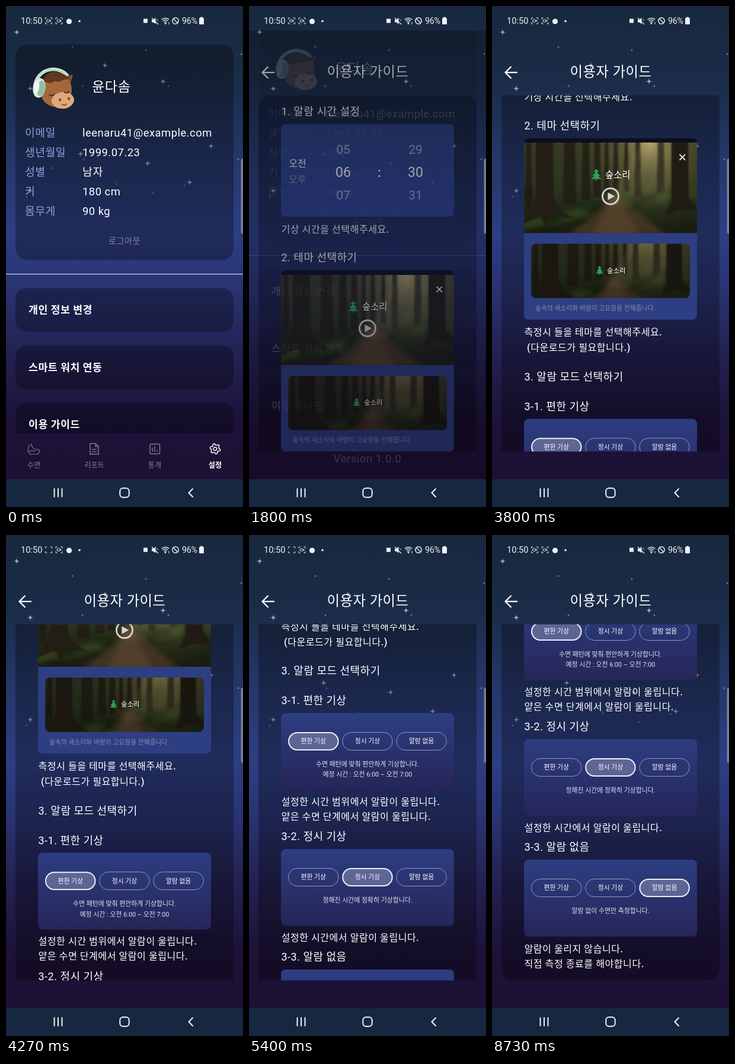
An HTML page with a canvas for the animation above (8.8 s loop, 400 by 844 pixels).

```html
<!DOCTYPE html>
<html lang="ko">
<head>
<meta charset="utf-8">
<title>이용자 가이드</title>
<style>
html, body { margin: 0; width: 100%; height: 100%; overflow: hidden; background: #18283e; }
canvas { display: block; width: 400px; height: 844px; }
</style>
</head>
<body>
<canvas id="stage"></canvas>
<script>
const W = 400, H = 844, LOOP = 8800;
const FONT = 'Roboto, "Noto Sans CJK KR", "Noto Sans CJK", sans-serif';
const SHADE = 'rgba(0,0,0,.3)';
const dpr = window.devicePixelRatio || 1;

function setUp(canvas, w = W, h = H) {
  canvas.width = w * dpr;
  canvas.height = h * dpr;
  const c = canvas.getContext('2d');
  c.scale(dpr, dpr);
  return c;
}
const main = setUp(document.getElementById('stage'));
const buffer = setUp(document.createElement('canvas'));
let g = main;

// ---- helpers ----
const clamp = v => Math.max(0, Math.min(1, v));
const span = (t, a, b) => clamp((t - a) / (b - a));
const flick = p => 1 - Math.pow(1 - Math.pow(p, 1.5), 3);

function text(s, x, cy, size, color = '#fff', { ls = 0.5, weight = 400, align = 'left' } = {}) {
  g.font = `${weight} ${size}px ${FONT}`;
  g.letterSpacing = ls + 'px';
  g.textAlign = align;
  g.fillStyle = color;
  g.fillText(s, x, cy + size * 0.36);
}
const centered = (s, x, cy, size, color, weight = 400) =>
  text(s, x, cy, size, color, { ls: 0, weight, align: 'center' });

function box(x, y, w, h, r, fill, stroke, lw = 1) {
  g.beginPath();
  g.roundRect(x, y, w, h, r);
  if (fill) { g.fillStyle = fill; g.fill(); }
  if (stroke) { g.strokeStyle = stroke; g.lineWidth = lw; g.stroke(); }
}
function line(points, color, lw, close) {
  g.beginPath();
  points.forEach(([x, y]) => g.lineTo(x, y));
  if (close) g.closePath();
  g.strokeStyle = color;
  g.lineWidth = lw;
  g.stroke();
}
function poly(points, fill) {
  g.beginPath();
  points.forEach(([x, y]) => g.lineTo(x, y));
  g.fillStyle = fill;
  g.fill();
}
function oval(x, y, rx, ry, fill, rot = 0) {
  g.beginPath();
  g.ellipse(x, y, rx, ry, rot, 0, 7);
  g.fillStyle = fill;
  g.fill();
}
function arc(x, y, r, a, b, color, lw) {
  g.beginPath();
  g.arc(x, y, r, a, b);
  g.strokeStyle = color;
  g.lineWidth = lw;
  g.stroke();
}
function shade(y0, y1, ...stops) {
  const gr = g.createLinearGradient(0, y0, 0, y1);
  stops.forEach(([p, c]) => gr.addColorStop(p, c));
  return gr;
}
function clipped(x, y, w, h, r, draw) {
  g.save();
  g.beginPath();
  g.roundRect(x, y, w, h, r);
  g.clip();
  draw();
  g.restore();
}
function layer(alpha, draw) {
  if (alpha <= 0) return;
  if (alpha >= 1) return draw();
  g = buffer;
  g.clearRect(0, 0, W, H);
  draw();
  g = main;
  g.globalAlpha = alpha;
  g.drawImage(buffer.canvas, 0, 0, W, H);
  g.globalAlpha = 1;
}

// ---- backdrop ----
const bigStars = [[18, 44], [167, 100], [265, 127], [41, 139], [346, 236], [126, 249], [239, 265], [310, 297], [41, 311]];
const smallStars = [[112, 69], [236, 74], [397, 81], [274, 135], [129, 135], [131, 258], [392, 258], [78, 273], [187, 300], [301, 302], [35, 321], [248, 315]];

function star(x, y, r) {
  g.beginPath();
  g.moveTo(x, y - r);
  g.quadraticCurveTo(x, y, x + r, y);
  g.quadraticCurveTo(x, y, x, y + r);
  g.quadraticCurveTo(x, y, x - r, y);
  g.quadraticCurveTo(x, y, x, y - r);
  g.fill();
}
function backdrop() {
  g.fillStyle = shade(0, 797, [0, '#18283e'], [.16, '#1b2c48'], [.32, '#25376a'], [.48, '#2d3e82'],
    [.6, '#293371'], [.73, '#232253'], [.88, '#1d1238'], [1, '#1c1034']);
  g.fillRect(0, 0, W, H);
  g.fillStyle = 'rgba(205,205,215,.6)';
  bigStars.forEach(([x, y]) => { star(x, y, 6); oval(x, y, 1.6, 1.6, g.fillStyle); });
  smallStars.forEach(([x, y]) => oval(x, y, 1.5, 1.5, 'rgba(190,190,205,.5)'));
}

// ---- system bars ----
function viewfinder(x, camera) {
  const c = '#e8ebee', y = 25;
  for (const sx of [-1, 1]) for (const sy of [-1, 1])
    line([[x + sx * 2.8, y + sy * 5], [x + sx * 5.5, y + sy * 5], [x + sx * 5.5, y + sy * 2.5]], c, 1);
  if (!camera) return;
  box(x - 3.2, y - 2, 4.6, 4, 1, null, c, 1);
  poly([[x + 1.5, y], [x + 3.6, y - 2], [x + 3.6, y + 2]], c);
}
function statusBar(t) {
  const c = '#eef0f2';
  const blink = (((t - 2670) % 1010) + 1010) % 1010 < 490;
  text('10:50', 25, 25, 14.6, c, { ls: 0 });
  viewfinder(72, blink);
  viewfinder(89.5, true);
  oval(106.5, 26, 4.6, 4.6, c);
  oval(124, 25.5, 1.8, 1.8, c);
  g.fillStyle = c;
  g.fillRect(232, 21.5, 7, 7);
  poly([[246, 23], [249, 23], [252.5, 19.5], [252.5, 30.5], [249, 27.5], [246, 27.5]], c);
  line([[246, 20], [257, 31]], c, 1.2);
  line([[254, 22], [257, 25]], c, 1);
  for (const r of [3.5, 6.5, 9.5]) arc(269, 30, r, -2.3, -.85, c, 1.3);
  oval(269, 29.5, 1.4, 1.4, c);
  line([[275, 27], [275, 31]], c, 1);
  arc(286, 25, 5.2, 0, 7, c, 1.5);
  line([[282.3, 21.3], [289.7, 28.7]], c, 1.5);
  text('96%', 297, 25, 14.4, c, { ls: -.4 });
  box(326, 20, 8, 11, 1.2, c);
  g.fillRect(328, 18.6, 4, 2);
}
function navBar() {
  g.fillStyle = '#16273f';
  g.fillRect(0, 797, W, 47);
  for (const x of [81.5, 88, 94.5]) line([[x, 812.5], [x, 827.5]], '#f2f3f5', 2);
  box(192.3, 812.3, 15.4, 15.4, 5, null, '#f2f3f5', 2);
  line([[315.5, 813], [308.5, 820], [315.5, 827.5]], '#f2f3f5', 2);
}
const edgeHandle = () => box(396.5, 257, 8, 127, 4, 'rgba(150,154,170,.72)');

// ---- profile ----
function avatar() {
  arc(80, 138, 31, 2.9, 5.6, '#b9dcc2', 5);
  arc(80, 138, 33.5, 2.9, 5.6, '#dfeee4', 1.5);
  poly([[96, 122], [113, 115], [109, 130]], '#8a4f2c');
  oval(84, 141, 27, 29, '#a5663d');
  oval(96, 159, 19, 14, '#e0a878', -.1);
  g.beginPath();
  g.moveTo(62, 128);
  g.bezierCurveTo(66, 108, 88, 104, 110, 124);
  g.bezierCurveTo(98, 122, 94, 126, 88, 128);
  g.quadraticCurveTo(82, 124, 76, 130);
  g.quadraticCurveTo(68, 128, 62, 128);
  g.fillStyle = '#62371f';
  g.fill();
  arc(77, 146, 5, .3, 2.6, '#3b2115', 1.7);
  arc(102, 142, 4.5, .3, 2.6, '#3b2115', 1.7);
  oval(91, 158, 1.8, 2.5, '#6b3b22');
  oval(106, 156, 1.8, 2.5, '#6b3b22');
  arc(98, 162, 5, .5, 2.5, '#6b3b22', 1.3);
  oval(56, 138, 10.5, 16.5, '#d9ebde', .15);
  oval(59, 139, 7, 13, '#8fc0a2', .15);
  oval(52, 137, 4, 11, '#eef6f0', .15);
}
const facts = [['이메일', 'leenaru41@example.com'], ['생년월일', '1999.07.23'], ['성별', '남자'], ['키', '180 cm'], ['몸무게', '90 kg']];
const menu = ['개인 정보 변경', '스마트 워치 연동', '이용 가이드'];

function profile(scroll, bottom) {
  clipped(0, 41, W, bottom - 41, 0, () => {
    g.translate(0, -scroll);
    box(16, 65, 368, 363, 20, SHADE);
    avatar();
    text('윤다솜', 145, 136, 23.2);
    facts.forEach(([label, value], i) => {
      const y = 213 + i * 33;
      text(label, 32, y, 18.2, '#8f9edb');
      text(value, 129, y, 18.4);
    });
    text('로그아웃', 200, 396, 14.3, '#85858f', { ls: .3, align: 'center' });
    g.fillStyle = '#ccd0de';
    g.fillRect(0, 451, W, 1.3);
    menu.forEach((label, i) => {
      const y = 475.5 + i * 96.5;
      box(16, y, 368, 73, 18, SHADE);
      text(label, 38, y + 36.5, 17.3, '#fff', { weight: 600 });
    });
    text('Version 1.0.0', 200, 793.5, 18.5, '#f4f4f8', { align: 'center' });
  });
}

function gear(x, y) {
  const pts = [];
  for (let i = 0; i < 24; i++) {
    const a = i * Math.PI / 12 + Math.PI / 24, r = i % 4 < 2 ? 8.8 : 6.4;
    pts.push([x + r * Math.sin(a), y + r * Math.cos(a)]);
  }
  line(pts, '#fff', 1.5, true);
  arc(x, y, 2.8, 0, 7, '#fff', 1.5);
}
function tabBar() {
  const c = '#7c7b8c';
  g.lineJoin = 'round';
  g.beginPath();
  g.moveTo(43, 738);
  g.bezierCurveTo(35, 742, 36, 752, 41, 755);
  g.lineTo(53, 755);
  g.bezierCurveTo(57, 753, 57, 749, 55, 747);
  g.bezierCurveTo(48, 748, 43, 744, 43, 738);
  g.moveTo(39, 751);
  g.bezierCurveTo(43, 746, 47, 752, 50, 749);
  g.strokeStyle = c;
  g.lineWidth = 1.2;
  g.stroke();
  line([[142, 737], [151, 737], [156, 742], [156, 755], [142, 755]], c, 1.5, true);
  line([[151, 737], [151, 742], [156, 742]], c, 1.3);
  for (const y of [747, 751]) line([[145, y], [153, y]], c, 1.3);
  box(243, 738, 16.5, 16.5, 2, null, c, 1.5);
  [[247, 744], [251, 741.5], [255, 748]].forEach(([x, y]) => line([[x, y], [x, 751]], c, 1.5));
  gear(353, 746);
  ['수면', '리포트', '통계', '설정'].forEach((s, i) =>
    centered(s, 47 + i * 102, 774, 12.2, i === 3 ? '#fff' : c, i === 3 ? 700 : 500));
  g.lineJoin = 'miter';
}

// ---- guide ----
const PW = 292, PH = 152.5;

// Soft woodland picture, painted once and reused.
function paintForest() {
  g = setUp(document.createElement('canvas'), PW, PH);
  g.fillStyle = shade(0, PH, [0, '#383b26'], [.5, '#2c341f'], [.72, '#202a16'], [1, '#1c1c10']);
  g.fillRect(0, 0, PW, PH);
  const glow = g.createRadialGradient(212, 0, 0, 205, 12, 135);
  glow.addColorStop(0, 'rgba(205,185,120,.8)');
  glow.addColorStop(.35, 'rgba(125,115,68,.5)');
  glow.addColorStop(1, 'rgba(60,65,35,0)');
  g.fillStyle = glow;
  g.fillRect(0, 0, PW, PH);
  g.filter = `blur(${1.6 * dpr}px)`;
  [[4, 8, 112], [68, 18, 104], [99, 11, 96], [119, 9, 92], [137, 5, 84], [152, 6, 80], [170, 5, 82], [188, 8, 92], [226, 10, 100]]
    .forEach(([x, w, h]) => poly([[x, -5], [x + w, -5], [x + w + 2, h], [x - 2, h]], 'rgba(34,29,20,.85)'));
  g.filter = `blur(${4 * dpr}px)`;
  for (let i = 0; i < 40; i++) {
    const x = PW * ((i * .381) % 1), y = 84 + 56 * ((i * .617) % 1);
    oval(x, y, 15, 8, i % 2 ? 'rgba(58,74,34,.6)' : 'rgba(22,32,15,.7)');
  }
  poly([[140, 88], [160, 88], [190, 115], [240, 155], [75, 155], [128, 115]], 'rgba(72,56,38,.85)');
  poly([[146, 92], [156, 92], [172, 115], [195, 155], [115, 155], [138, 115]], 'rgba(92,72,48,.6)');
  for (let i = 0; i < 4; i++)
    poly([[200 + i * 14, -5], [210 + i * 14, -5], [165 + i * 26, 105], [140 + i * 26, 105]], 'rgba(225,205,140,.13)');
  g.filter = `blur(${1.2 * dpr}px)`;
  poly([[20, -5], [49, -5], [50, 92], [60, 112], [86, 128], [48, 122], [38, 142], [28, 124], [-5, 138], [14, 112], [20, 90]], '#221e15');
  poly([[249, -5], [277, -5], [278, 92], [296, 116], [264, 112], [238, 122], [249, 98]], '#201c13');
  const forestCanvas = g.canvas;
  g = main;
  return forestCanvas;
}
const photo = paintForest();

// Fills the frame's width and crops the height about the middle.
function forest(x, y, w, h, r, dark) {
  clipped(x, y, w, h, r, () => {
    const full = w * PH / PW;
    g.drawImage(photo, x, y + (h - full) / 2, w, full);
    g.fillStyle = `rgba(0,0,0,${dark})`;
    g.fillRect(x, y, w, h);
  });
}
function pine(x, y, s) {
  g.fillStyle = '#7a4a28';
  g.fillRect(x - s * .13, y + s * .55, s * .26, s * .45);
  [[-1, .48, .5], [-.6, .68, .8], [-.05, .88, .75]].forEach(([top, half, hgt]) =>
    poly([[x, y + s * top], [x + s * half, y + s * (top + hgt)], [x - s * half, y + s * (top + hgt)]], '#27a552'));
}
function timePicker() {
  box(54, 199, 292, 156, 8, shade(199, 355, [0, '#2c3c7d'], [1, '#2f4190']));
  const dim = '#a3aac6';
  [['05', '29', 241], ['06', '30', 280], ['07', '31', 318]].forEach(([h, m, y], i) => {
    const c = i === 1 ? '#fff' : dim, size = i === 1 ? 23 : 21;
    centered(h, 159, y, size, c);
    centered(m, 281, y, size, c);
  });
  centered(':', 220, 280, 22, '#fff', 500);
  centered('오전', 82, 265, 16, '#fff');
  centered('오후', 82, 292, 16, '#8b8b98');
}
function themeCard() {
  box(54, 445, 292, 306, 8, '#2d3e82');
  box(54, 445, 292, 20, [8, 8, 0, 0], '#0a0e1f');
  forest(54, 452.5, PW, PH, 0, 0);
  line([[316.5, 472.5], [326, 482]], '#fff', 1.6);
  line([[326, 472.5], [316.5, 482]], '#fff', 1.6);
  pine(176, 507, 10);
  text('숲소리', 191, 506.5, 15.4, '#fff', { ls: 0, weight: 500 });
  arc(200, 543, 13.5, 0, 7, '#d8d8d2', 2.8);
  poly([[195.5, 536.5], [207, 543], [195.5, 549.5]], '#d8d8d2');
  forest(66, 623, 268, 91.5, 8, .22);
  pine(181.5, 668, 7.5);
  text('숲소리', 194, 668, 11.4, '#fff', { ls: 0, weight: 500 });
  text('숲속의 새소리와 바람이 고요함을 전해줍니다.', 73, 731.5, 10.8, '#8a8ea8', { ls: 0 });
}
function modeCard(y, chosen, lines) {
  box(54, y, 292, 129.5, 8, shade(y, y + 129, [0, '#2d3e82'], [1, '#262558']));
  ['편한 기상', '정시 기상', '알람 없음'].forEach((label, i) => {
    const x = 66 + i * 91.2, on = i === chosen, lw = on ? 2 : 1;
    box(x + lw / 2, y + 32 + lw / 2, 85.5 - lw, 31 - lw, 15, on ? 'rgba(255,255,255,.24)' : null, on ? '#eef0f6' : '#8f9abf', lw);
    centered(label, x + 42.7, y + 47.5, 10.8, '#fff', on ? 500 : 400);
  });
  lines.forEach((s, i) => centered(s, 200, y + 86 + i * 17.5, 10.9, '#dfe2ee'));
}
const headings = [['1. 알람 시간 설정', 178], ['2. 테마 선택하기', 424], ['3. 알람 모드 선택하기', 847],
  ['3-1. 편한 기상', 897], ['3-2. 정시 기상', 1126], ['3-3. 알람 없음', 1329]];
const notes = [['기상 시간을 선택해주세요.', 376], ['측정시 들을 테마를 선택해주세요.', 772], [' (다운로드가 필요합니다.)', 798],
  ['설정한 시간 범위에서 알람이 울립니다.', 1067], ['얕은 수면 단계에서 알람이 울립니다.', 1092.5],
  ['설정한 시간에서 알람이 울립니다.', 1296], ['알람이 울리지 않습니다.', 1500], ['직접 측정 종료를 해야합니다.', 1525]];

function guide(scroll, stretch) {
  line([[43, 112], [23, 112]], '#fff', 2.3);
  line([[32.5, 102], [22.5, 112], [32.5, 122]], '#fff', 2.3);
  text('이용자 가이드', 200.5, 110.3, 23.3, '#fff', { align: 'center' });
  clipped(0, 150.5, W, 600, 0, () => {
    g.translate(0, 750.5);
    g.scale(1, 1 + stretch);
    g.translate(0, -750.5 - scroll);
    box(16, 150.5, 368, 1403, 20, SHADE);
    timePicker();
    themeCard();
    modeCard(918, 0, ['수면 패턴에 맞춰 편안하게 기상합니다.', '예정 시간 : 오전 6:00 – 오전 7:00']);
    modeCard(1147, 1, ['정해진 시간에 정확히 기상합니다.']);
    modeCard(1350, 2, ['알람 없이 수면만 측정합니다.']);
    headings.forEach(([s, y]) => text(s, 54.5, y, 18));
    notes.forEach(([s, y]) => text(s, 54.5, y, 16.1, '#fff', { weight: 500 }));
  });
}

// ---- timeline ----
const swipes = [[3000, 3400, 187], [3670, 4530, 211], [4600, 5400, 220], [5670, 6250, 185]];
const guideScroll = t => swipes.reduce((sum, [a, b, d]) => sum + d * flick(span(t, a, b)), 0);
const guideStretch = t => .025 * span(t, 6000, 6180) * Math.pow(1 - span(t, 6180, 6670), 1.5);

function draw(t) {
  const leaving = t >= 1530;
  const shown = 1 - Math.pow(1 - span(t, 1530, 2130), 2.5);
  backdrop();
  layer(1 - shown, () => profile(leaving ? 31.5 : 109.5 * flick(span(t, 130, 1000)), leaving ? 797 : 720));
  if (!leaving) tabBar();
  layer(shown, () => guide(guideScroll(t), guideStretch(t)));
  // The whole screen darkens while the two pages cross.
  g.fillStyle = `rgba(0,0,0,${1.3 * shown * (1 - shown)})`;
  g.fillRect(0, 41, W, 756);
  statusBar(t);
  navBar();
  edgeHandle();
}
function tick() {
  draw(performance.now() % LOOP);
  requestAnimationFrame(tick);
}
tick();
</script>
</body>
</html>
```
